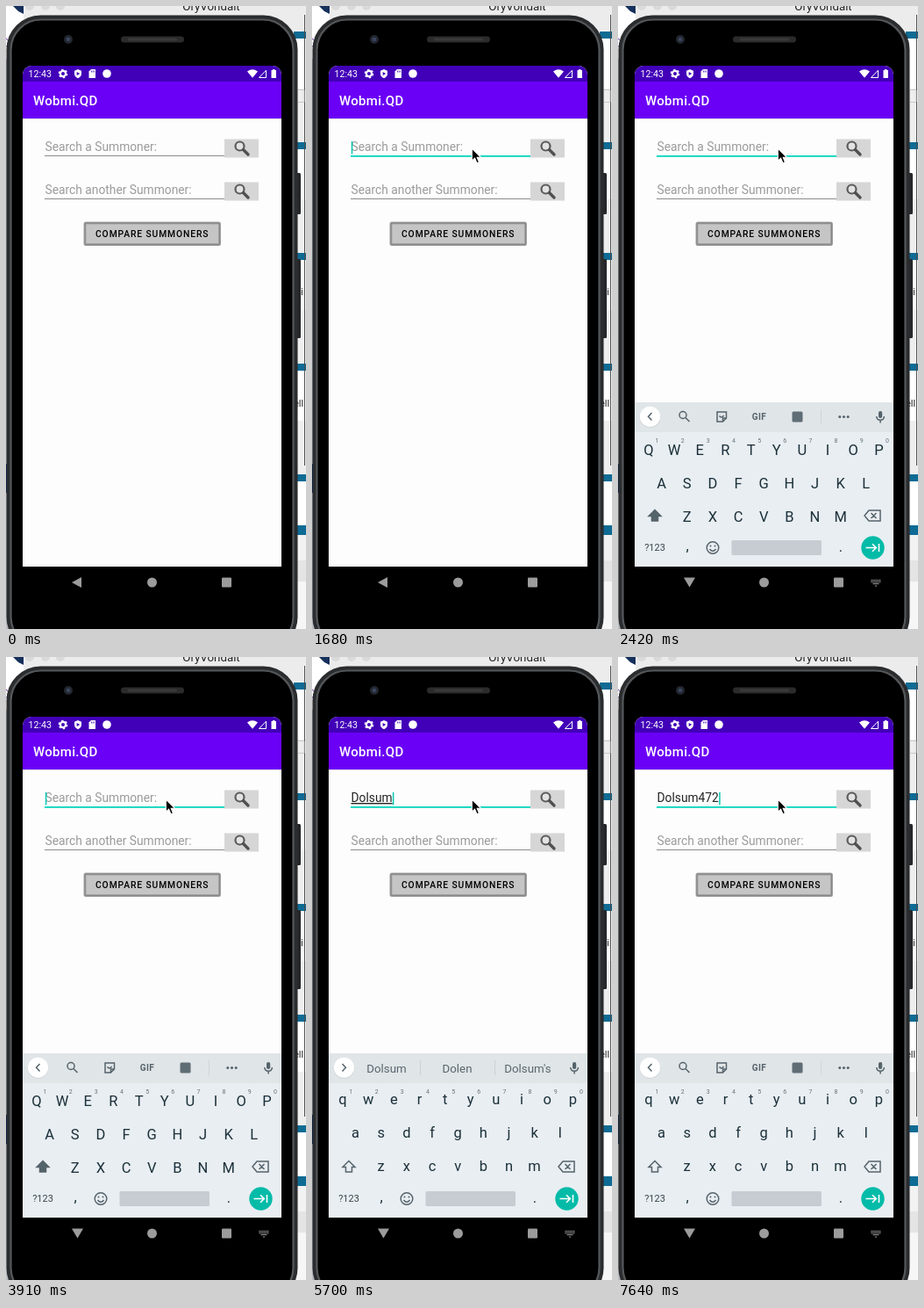
Recreate the animation shown at these times as an HTML page. Size 342 px wide and 709 px high, loop 8 s.

```html
<!DOCTYPE html>
<html lang="en">
<head>
<meta charset="utf-8">
<title>Summoner search</title>
<style>
  html, body { margin: 0; width: 100%; height: 100%; overflow: hidden; background: #f4f4f4; }
  svg { display: block; width: 100vw; height: 100vh; }
  text { font-family: Roboto, Arial, sans-serif; white-space: pre; }
  .mid { text-anchor: middle; }
  .field { font-size: 13.8px; }
  .hint { fill: #9b9b9b; }
  .key { font-size: 16.5px; fill: #1b303a; }
  .num { font-size: 7px; fill: #66737b; }
  .word { font-size: 13.3px; fill: #5a666d; }
  .line { fill: none; stroke: #55636b; stroke-width: 1.5; }
</style>
</head>
<body>
<svg viewBox="0 0 342 709" preserveAspectRatio="none">
  <defs>
    <clipPath id="screen"><rect x="19" y="68" width="295" height="606" rx="10"/></clipPath>
    <g id="lens">
      <rect x="249" y="151.5" width="39" height="21" fill="#d6d6d6"/>
      <circle cx="266.5" cy="159.5" r="5" fill="#e2e2e2" stroke="#5b5b5b" stroke-width="2.2"/>
      <path d="M270.5 163.5L276 169" stroke="#505050" stroke-width="3.4" stroke-linecap="round"/>
    </g>
  </defs>

  <!-- desktop behind the phone -->
  <rect width="342" height="709" fill="#f4f4f4"/>
  <rect width="20" height="60" fill="#fff"/>
  <path d="M8 0H20V9L14 6Z" fill="#15305c"/>
  <path d="M0 37Q4 39 3 45L0 46" fill="none" stroke="#6a2fa0"/>
  <rect y="60" width="3" height="649" fill="#b9bcc2"/>
  <rect y="521" width="3" height="33" fill="#0b2d60"/>
  <rect x="20" width="322" height="28" fill="#ececec"/>
  <g fill="#dadada"><circle cx="27" r="5"/><circle cx="45" r="5"/><circle cx="62" r="5"/></g>
  <text class="mid" x="234" y="5" font-size="13.3" fill="#222">OryVondalt</text>
  <g id="desk"></g>
  <path d="M340.5 10V523" stroke="#4d4d4d"/>
  <path d="M333 95.5H340V109.5H333" fill="none" stroke="#c8c8c8"/>
  <g font-size="11" fill="#222"><text x="336" y="329">i</text><text x="328" y="456">ell</text></g>
  <rect x="328" y="631" width="14" height="78" fill="#e4e4e4"/>
  <rect x="328" y="655" width="14" height="54" fill="#f6f6f6"/>

  <!-- phone -->
  <g fill="#25272a">
    <rect x="329" y="190" width="7" height="47" rx="1.5"/>
    <rect x="329" y="288" width="7" height="90" rx="1.5"/>
  </g>
  <rect x=".5" y="10.5" width="332" height="724" rx="39" fill="#2a2c2e"/>
  <rect x="5.5" y="15.5" width="322" height="714" rx="34.5" stroke="#55585b" stroke-width="2.2"/>
  <rect x="131" y="34.5" width="72" height="7" rx="3.5" fill="#2b2b2c"/>
  <rect x="139" y="36.5" width="56" height="3" rx="1.5" fill="#3a3a3b"/>
  <circle cx="71" cy="38" r="5" fill="#23272f"/><circle cx="71" cy="38" r="2.3" fill="#3a4660"/>

  <g clip-path="url(#screen)">
    <rect x="19" y="68" width="295" height="570" fill="#fdfdfd"/>
    <rect x="19" y="68" width="295" height="18" fill="#4100b8"/>
    <rect x="19" y="86" width="295" height="42" fill="#6a00f6"/>
    <rect x="19" y="128" width="295" height="1" fill="#e2e2e2"/>
    <g fill="#fff">
      <text x="25.5" y="81" font-size="10.6">12:43</text>
      <circle cx="65" cy="77" r="3.1" fill="none" stroke="#fff" stroke-width="2.2"/>
      <circle cx="65" cy="77" r="4.6" fill="none" stroke="#fff" stroke-width="1.4" stroke-dasharray="2.4"/>
      <path d="M82 72L86 73.7V77Q86 80.5 82 82.2Q78 80.5 78 77V73.7Z"/>
      <path d="M80.7 74.9L84.2 77L80.7 79.1Z" fill="#4100b8"/>
      <path d="M97 72H102V82H94.5V74.5Z"/>
      <path d="M97.5 73.5V75.5M99 73.5V75.5M100.5 73.5V75.5" stroke="#4100b8" stroke-width=".7"/>
      <circle cx="115" cy="77" r="4.8"/>
      <path d="M275 74.5Q281 70 287 74.5L281 81.8ZM302.5 73H304V72H306.5V73H308V82H302.5Z"/>
      <path d="M296.5 73.2V81.5H288.5Z" fill="none" stroke="#fff"/>
      <text x="31" y="113" font-size="15" font-weight="500" letter-spacing=".3">Wobmi.QD</text>
    </g>
    <text id="entry" class="field" x="44.5" y="165"></text>
    <text class="field hint" x="44.5" y="214">Search another Summoner:</text>
    <path d="M44 170.5H249M44 219.5H249" stroke="#8c8c8c"/>
    <rect id="focus" x="44" y="170" width="205" height="1.8" fill="#08d5bd"/>
    <rect id="caret" y="154" width="1.5" height="14.5" fill="#08c9b3"/>
    <use href="#lens"/><use href="#lens" y="49"/>
    <rect x="90" y="247" width="153.5" height="24.500" rx="1" fill="#c5c5c5" stroke="#a6a6a6" stroke-width="3"/>
    <rect x="90" y="247" width="153.5" height="24.500" rx="1" fill="none" stroke="#888" stroke-width="1.300"/>
    <text class="mid" x="166.7" y="263" font-size="10.3" font-weight="500" letter-spacing=".9">COMPARE SUMMONERS</text>

    <rect id="under" x="19" y="638" width="295" height="36" fill="#fdfdfd"/>
    <g id="board">
      <rect x="19" y="451" width="295" height="35" fill="#e0e5e8"/>
      <rect x="19" y="485" width="295" height="153" fill="#e9eef2"/>
      <circle cx="36.5" cy="468" r="11.8" fill="#c9ced1"/>
      <circle cx="36.5" cy="467.3" r="11.6" fill="#fff"/>
      <path id="chevron" class="line" d="M38.5 463L34.5 467.3L38.5 471.6"/>
      <g id="tools">
        <circle class="line" cx="74" cy="465.5" r="4"/><path class="line" d="M77 468.5L81.5 473"/>
        <path class="line" d="M113 462H123.5V469L119.5 473H113ZM119.5 473V469H123.5M115.5 466.5Q118 469.5 120.5 466"/>
        <text class="mid" x="161" y="471" font-size="10" font-weight="700" fill="#55636b" letter-spacing=".5">GIF</text>
        <rect x="198.5" y="461.5" width="12" height="12" rx="1.5" fill="#5f6d75"/>
        <path d="M231.5 459V476" stroke="#d0d6da"/>
        <g fill="#55636b"><circle cx="252.8" cy="467.5" r="1.5"/><circle cx="257.5" cy="467.5" r="1.5"/><circle cx="262.2" cy="467.5" r="1.5"/></g>
      </g>
      <g id="words">
        <path d="M123.5 459V476M208.5 459V476" stroke="#cbd1d5"/>
        <text class="mid word" x="85" y="473"></text>
        <text class="mid word" x="165.5" y="473"></text>
        <text class="mid word" x="246" y="473"></text>
      </g>
      <rect x="297" y="461" width="4.2" height="8" rx="2.1" fill="#55636b"/>
      <path class="line" d="M294.8 467Q295 471.3 299.1 471.3T303.4 467M299.1 471.3V474.5"/>
      <g id="keys"></g>
      <path id="shift" class="line" d="M42 573.5L49 580.5H45.5V586H38.5V580.5H35Z"/>
      <path class="line" d="M286 574H299V586H286L281 580ZM288.5 577L294.5 583M294.5 577L288.5 583"/>
      <text class="mid" x="42" y="620" font-size="11" fill="#37454c">?123</text>
      <text class="mid key" x="79" y="620">,</text>
      <text class="mid key" x="254" y="621">.</text>
      <circle class="line" cx="108" cy="616.5" r="6.8"/>
      <path class="line" d="M104.5 618Q108 622.5 111.5 618"/>
      <circle cx="105.5" cy="614.5" r="1" fill="#55636b"/><circle cx="110.5" cy="614.5" r="1" fill="#55636b"/>
      <rect x="129.5" y="608" width="102.5" height="17" rx="1.5" fill="#c6ccd1"/>
      <circle cx="290.5" cy="616.5" r="13.2" fill="#04bba8"/>
      <path d="M282.5 616.5H294M290 612.3L294.3 616.5L290 620.7M297.5 612V621" fill="none" stroke="#fff" stroke-width="1.6"/>
    </g>
    <rect id="shade" x="19" y="638" width="295" height="36" opacity=".53"/>
  </g>

  <g fill="#9c9c9c">
    <path id="back"/>
    <circle cx="166.5" cy="656" r="5.5"/>
    <rect x="246" y="650.5" width="11" height="11" rx="1"/>
    <g id="hide">
      <path d="M288.5 653.5H299.5M288.5 655.5H299.5" stroke="#8a8a8a" stroke-width="1.3" stroke-dasharray="1.3 .6"/>
      <path d="M290.5 657.5H297.5" stroke="#8a8a8a" stroke-width="1.2"/>
      <path d="M292.500 659.500H295.500L294 661Z"/>
    </g>
  </g>
  <path id="mouse" d="M0 0V14.2L3.3 11.2L5.7 16.8L8.2 15.7L5.9 10.3H10.3Z" stroke="#fff" stroke-width="1.1"/>
</svg>
<script>
const $ = id => document.getElementById(id);
const count = (times, t) => times.filter(x => t >= x).length;
const show = (id, on) => $(id).setAttribute('opacity', +on);

const LOOP = 8000;
const NAME = 'Dolsum472';
const TYPED = [4060, 4360, 4810, 5260, 5400, 5700, 7190, 7490, 7640];
const BLINK = [1540, 2130, 2560, 3010, 3610, 6150, 6750];
const GUESSES = ['', 'D Do Di', 'Do Don Dog', 'Dol Dolen Dols', 'Dols Dolen Dolsa',
  'Dolsu Dolen Dolsum', "Dolsum Dolen Dolsum's"];

// striped window on the right
let desk = '';
for (let y = 30; y < 600; y += 126) {
  desk += `<rect x="328" y="${y}" width="14" height="64" fill="#fff"/>
    <rect x="328" y="${y + 64}" width="14" height="62" fill="#eee"/>
    <rect x="328" y="${y - 1}" width="14" height="8" fill="#0f6b94"/>`;
}
$('desk').innerHTML = desk + '<rect x="328" y="591" width="14" height="11" fill="#0f6b94"/><rect x="328" y="602" width="14" height="29" fill="#f2f2f2"/>';

// letter keys
const STEP = 29.15;
let keys = '', nums = '';
[['qwertyuiop', 35], ['asdfghjkl', 49.6], ['zxcvbnm', 78.7]].forEach(([row, x0], r) => {
  [...row].forEach((c, i) => {
    const x = x0 + i * STEP;
    keys += `<text class="mid key" x="${x}" y="${509 + 38 * r}">${c}</text>`;
    if (!r) nums += `<text class="mid num" x="${x + 9.5}" y="497">${(i + 1) % 10}</text>`;
  });
});
$('keys').innerHTML = `<g id="letters">${keys}</g>${nums}`;
const letters = [...$('letters').children];
const words = [...document.querySelectorAll('#words text')];

function draw(t) {
  // pointer glides up in coarse steps
  const p = Math.min(5, Math.floor((t - 500) / 148)) / 5;
  const left = (1 - p) ** 2;
  show('mouse', t >= 500);
  $('mouse').setAttribute('transform', `translate(${182.3 + 14 * left} ${162 + 88 * left})`);

  // search field, underlined while the word is being composed
  const n = count(TYPED, t);
  const entry = $('entry');
  entry.textContent = n ? NAME.slice(0, n) : 'Search a Summoner:';
  entry.setAttribute('fill', n ? '#222' : '#9b9b9b');
  entry.style.textDecoration = n > 0 && n < NAME.length ? 'underline' : 'none';
  $('focus').setAttribute('opacity', [0, .5, 1][count([1390, 1540], t)]);
  show('caret', count(BLINK, t) % 2);
  $('caret').setAttribute('x', 44.8 + (n ? entry.getComputedTextLength() : 0));

  // keyboard slides in over a translucent navigation bar
  const stage = count([2130, 2270, 2410], t);
  const sliding = stage === 1 || stage === 2;
  $('board').setAttribute('transform', `translate(0 ${[0, 59, 12, 0][stage]})`);
  $('board').setAttribute('opacity', [0, .58, .92, 1][stage]);
  show('under', sliding);
  $('shade').setAttribute('opacity', sliding ? .53 : 0);
  show('hide', stage === 3);
  $('back').setAttribute('d', stage === 3 ? 'M75 650.5H88L81.5 661.5Z' : 'M86 650V662L75 656Z');

  const caps = stage > 1 && !n;
  letters.forEach(k => {
    k.textContent = caps ? k.textContent.toUpperCase() : k.textContent.toLowerCase();
  });
  $('letters').setAttribute('transform', `translate(0 ${caps ? 1.5 : 0})`);
  $('shift').style.fill = caps ? '#55636b' : 'none';

  // suggestion strip
  const guess = (GUESSES[n] || '').split(' ');
  words.forEach((w, i) => { w.textContent = guess[i] || ''; });
  show('words', n > 0 && n < 7);
  $('tools').setAttribute('opacity', n === 0 || n === 9 ? 1 : n === 8 ? .5 : 0);
  $('chevron').setAttribute('transform', n > 0 && n < 9 ? 'rotate(180 36.5 467.3)' : '');
}

const start = performance.now();
function tick() {
  draw((performance.now() - start) % LOOP);
  requestAnimationFrame(tick);
}
tick();
</script>
</body>
</html>
```
